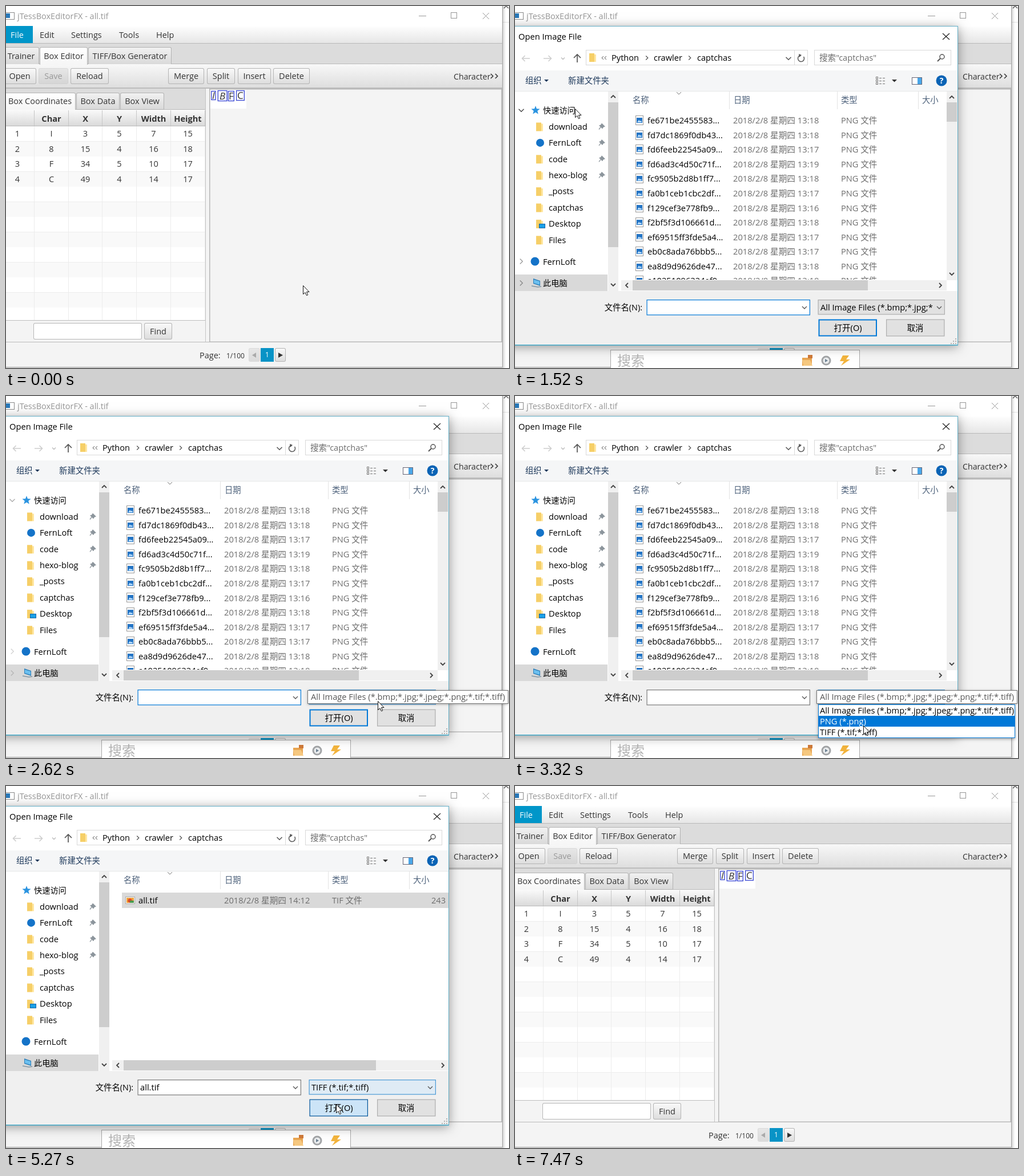
These frames come from a looping animation (881x635 px, 7600 ms). An HTML page with a canvas:

```html
<!DOCTYPE html>
<html lang="en">
<head>
<meta charset="utf-8">
<title>Box editor</title>
<style>
html, body { margin: 0; width: 100%; height: 100%; overflow: hidden; background: #fff; }
canvas { display: block; }
</style>
</head>
<body>
<canvas id="stage" width="881" height="635"></canvas>
<script>
const LOOP = 7600;
const g = document.getElementById('stage').getContext('2d');
const FONT = '"Open Sans", "Noto Sans CJK SC", "Noto Sans CJK JP", sans-serif';

// Drawing helpers
function rect(x, y, w, h, fill) {
  g.fillStyle = fill;
  g.fillRect(x, y, w, h);
}
function fade(y, h, top, bottom) {
  const c = g.createLinearGradient(0, y, 0, y + h);
  c.addColorStop(0, top);
  c.addColorStop(1, bottom);
  return c;
}
function frame(x, y, w, h, fill, border, line = 1) {
  rect(x, y, w, h, border);
  rect(x + line, y + line, w - 2 * line, h - 2 * line, fill);
}
function rounded(x, y, w, h, r, fill) {
  g.fillStyle = fill;
  g.beginPath();
  g.roundRect(x, y, w, h, r);
  g.fill();
}
function text(s, x, cy, color = '#333', size = 14.5, align = 'left', style = '') {
  g.font = `${style} ${size}px ${FONT}`;
  g.textAlign = align;
  g.fillStyle = color;
  g.fillText(s, x, Math.round(cy + size * 0.36));
}
function line(points, color, width = 1) {
  g.strokeStyle = color;
  g.lineWidth = width;
  g.beginPath();
  for (let i = 0; i < points.length; i += 2) g.lineTo(points[i], points[i + 1]);
  g.stroke();
}
function poly(points, fill) {
  g.fillStyle = fill;
  g.beginPath();
  for (let i = 0; i < points.length; i += 2) g.lineTo(points[i], points[i + 1]);
  g.fill();
}
function disc(x, y, r, fill) {
  g.fillStyle = fill;
  g.beginPath();
  g.arc(x, y, r, 0, 7);
  g.fill();
}
function chevron(x, y, dir, color = '#555', s = 4, width = 1.3) {
  const d = s / 2;
  const shape = {
    down: [x - s, y - d, x, y + d, x + s, y - d],
    up: [x - s, y + d, x, y - d, x + s, y + d],
    left: [x + d, y - s, x - d, y, x + d, y + s],
    right: [x - d, y - s, x + d, y, x - d, y + s]
  }[dir];
  line(shape, color, width);
}
function clipped(x, y, w, h, draw) {
  g.save();
  g.beginPath();
  g.rect(x, y, w, h);
  g.clip();
  draw();
  g.restore();
}
// Soft shadow around a box, leaving its inside untouched
function shadow(x, y, w, h, blur, drop, color) {
  g.save();
  g.beginPath();
  g.rect(0, 0, 881, 635);
  g.rect(x, y, w, h);
  g.clip('evenodd');
  g.shadowColor = color;
  g.shadowBlur = blur;
  g.shadowOffsetY = drop;
  rect(x, y, w, h, '#000');
  g.restore();
}

// Pointer: start, end, steps, then [progress, x, y] way points
const MOVES = [
  [70, 360, 5, [0, 520, 490], [1, 8, 114]],
  [1000, 1750, 11, [0, 8, 114], [4 / 11, 100, 178], [1, 112, 182]],
  [1840, 2540, 10, [0, 112, 182], [0.3, 572, 447], [0.7, 640, 505], [1, 650, 534]],
  [2620, 3320, 10, [0, 650, 534], [0.4, 655, 536], [1, 610, 578]],
  [3400, 3470, 2, [0, 610, 578], [1, 612, 587]],
  [3720, 4330, 9, [0, 612, 587], [0.12, 612, 587], [7 / 9, 241, 203], [1, 241, 203]],
  [4480, 5190, 10, [0, 241, 203], [0.5, 430, 400], [0.8, 600, 528], [1, 578, 558]],
  [6430, 6970, 8, [0, 578, 558], [0.25, 590, 566], [1, 755, 650]]
];
function pointer(t) {
  let at = [520, 490];
  for (const [start, end, n, ...way] of MOVES) {
    if (t < start) break;
    const step = Math.floor((t - start) / ((end - start) / (n - 1)) + 1e-6) + 1;
    const p = Math.min(1, step / n);
    const i = Math.max(1, way.findIndex(w => w[0] >= p));
    const a = way[i - 1], b = way[i], k = (p - a[0]) / (b[0] - a[0]);
    at = [a[1] + (b[1] - a[1]) * k, a[2] + (b[2] - a[2]) * k];
  }
  return at;
}
function drawPointer(x, y) {
  g.save();
  g.translate(Math.round(x) + 0.5, Math.round(y) + 0.5);
  const arrow = [0, 0, 0, 15, 3.5, 12, 6, 17.3, 8.2, 16.3, 6, 11, 10.5, 11, 0, 0];
  poly(arrow, '#fff');
  line(arrow, '#111');
  g.restore();
}

// Main window
function button(label, x, y, w, h, state) {
  g.globalAlpha = state === 'off' ? 0.4 : 1;
  const down = state === 'down';
  rounded(x, y, w, h, 3, down ? '#a2a2a2' : '#b4b4b4');
  rounded(x + 1, y + 1, w - 2, h - 2, 2,
    down ? fade(y, h, '#c9c9c9', '#d3d3d3') : fade(y, h, '#fafafa', '#dcdcdc'));
  text(label, x + w / 2, y + h / 2, '#333', 14.5, 'center');
  g.globalAlpha = 1;
}
function tab(label, x, y, w, h, cx, on) {
  rounded(x, y, w, h + 1, [3, 3, 0, 0], '#b2b2b2');
  rounded(x + 1, y + 1, w - 2, h + (on ? 1 : -1), [2, 2, 0, 0],
    on ? fade(y, h, '#fff', '#f6f6f6') : fade(y, h, '#f2f2f2', '#d9d9d9'));
  text(label, cx, y + h / 2 + 0.5, '#333', 14.5, 'center');
}
const COLS = [-10, 49, 109, 168, 228, 288, 348];
const BOXES = [['I', 3, 5, 7, 15], ['8', 15, 4, 16, 18], ['F', 34, 5, 10, 17], ['C', 49, 4, 14, 17]];

function drawTable() {
  const mid = c => c ? (COLS[c] + COLS[c + 1]) / 2 + 0.5 : 20;
  rect(0, 182, 349, 370, '#fff');
  rect(0, 182, 349, 28, fade(182, 28, '#fafafa', '#dadada'));
  rect(0, 210, 349, 1, '#b9b9b9');
  ['', 'Char', 'X', 'Y', 'Width', 'Height'].forEach((s, c) =>
    text(s, mid(c), 197.5, '#333', 14.6, 'center', 'bold'));
  clipped(0, 211, 349, 340, () => {
    for (let r = 0; r < 13; r++) {
      const y = Math.round(211 + r * 26.5);
      rect(0, y, 349, 27, r % 2 ? '#f9f9f9' : '#fff');
      rect(0, y + 26, 349, 1, '#ededed');
      if (r < 4) [r + 1, ...BOXES[r]].forEach((s, c) =>
        text(s, mid(c), y + 13, '#333', 14.5, 'center'));
    }
    for (const x of COLS.slice(1)) rect(x, 211, 1, 341, '#ececec');
  });
  for (const x of COLS.slice(1)) rect(x, 183, 1, 27, '#c6c6c6');
  rect(0, 551, 350, 1, '#bdbdbd');
  rect(349, 182, 1, 370, '#bdbdbd');
}
function drawSample() {
  rect(358, 147, 63, 33, '#fff');
  BOXES.forEach(([s, x, y, w, h], i) => {
    const bx = x * 0.95 + 357, by = y + 144.5, bw = w * 0.95 + 0.5;
    text(s === '8' ? 'B' : s, bx + bw / 2, by + h / 2, '#333', 17, 'center', i < 2 ? 'italic' : '');
    g.strokeStyle = '#3644d2';
    g.lineWidth = 1.3;
    g.strokeRect(bx, by, bw, h);
  });
}
function drawMain(active, menuOn, openDown) {
  rect(0, 0, 881, 635, '#fff');
  rect(870, 28, 11, 1, '#e4e4e4');
  chevron(876, 2, 'up', '#666', 4, 1.5);
  for (let i = 0; i < 7; i++) rect(870 + i, 0, 1, 635, `rgba(0,0,0,${0.17 * (1 - i / 7) ** 2})`);
  rect(0, 0, 869, 633, '#f4f4f4');
  rect(0, 0, 869, 36, '#fff');
  frame(-6, 11, 21, 13, '#fff', '#8a8a8a');
  rect(0, 13, 7, 8, '#2878b8');
  const ink = active ? '#000' : '#969696';
  text('jTessBoxEditorFX - all.tif', 20, 17.5, ink, 14.5);
  line([723, 17.5, 736, 17.5], ink);
  g.strokeRect(779.5, 11.5, 10, 10);
  line([835, 12, 846, 23], ink);
  line([846, 12, 835, 23], ink);

  rect(0, 36, 869, 29, fade(36, 29, '#fdfdfd', '#e6e6e6'));
  rect(0, 65, 869, 1, '#b9b9b9');
  if (menuOn) rect(0, 35, 47, 30, '#0096c9');
  text('File', 8, 50.5, menuOn ? '#fff' : '#333');
  [['Edit', 59], ['Settings', 114], ['Tools', 198], ['Help', 263]].forEach(([s, x]) => text(s, x, 50.5));

  rect(0, 66, 869, 36, '#dcdcdc');
  rect(0, 101, 869, 1, '#b9b9b9');
  tab('Trainer', -8, 72, 66, 30, 26.5);
  tab('TIFF/Box Generator', 144, 72, 146, 30, 217);
  rect(0, 102, 869, 41, fade(102, 41, '#f8f8f8', '#dedede'));
  rect(0, 143, 869, 2, '#bcbcbc');
  tab('Box Editor', 59, 72, 84, 30, 101, true);
  button('Open', -5, 109, 58, 28, openDown ? 'down' : '');
  button('Save', 57, 109, 52, 28, 'off');
  [['Reload', 113, 67], ['Merge', 284, 63], ['Split', 352, 49], ['Insert', 406, 58], ['Delete', 468, 64]]
    .forEach(([s, x, w]) => button(s, x, 109, w, 28));
  text('Character', 784, 123.5, '#333', 14.2);
  chevron(851, 123, 'right', '#333', 4, 1.5);
  chevron(859, 123, 'right', '#333', 4, 1.5);

  rect(0, 145, 350, 37, '#dcdcdc');
  rect(0, 181, 350, 1, '#b9b9b9');
  tab('Box Data', 123, 152, 76, 29, 161);
  tab('Box View', 200, 152, 77, 29, 238.5);
  tab('Box Coordinates', -4, 152, 126, 29, 59.5, true);
  drawTable();
  rect(349, 145, 1, 445, '#c4c4c4');
  frame(356, 145, 513, 445, '#f4f4f4', '#b7b7b7', 1.5);
  drawSample();
  rounded(48, 556, 190, 29, 3, '#b7b7b7');
  rounded(49, 557, 188, 27, 2, '#fff');
  button('Find', 242, 556, 49, 29);

  rect(0, 589, 869, 1, '#bababa');
  text('Page:', 339, 613);
  text('1/100', 386, 613.5, '#333', 12);
  button('', 425, 600, 20, 24, 'off');
  rect(446, 600, 23, 24, '#0893c6');
  text('1', 457.5, 612, '#fff', 12, 'center');
  button('', 471, 600, 19, 24);
  poly([438, 608, 438, 617, 431, 612.5], '#aaa');
  poly([477, 608, 477, 617, 485, 612.5], '#333');
  rect(0, 633, 870, 1, active ? '#707070' : '#a5a5a5');
  rect(869, 0, 1, 634, active ? '#707070' : '#a5a5a5');
  rect(0, 634, 870, 1, '#dedede');
}

// File dialog
const FILES = ('fe671be2455583 fd7dc1869f0db43 fd6feeb22545a09 fd6ad3c4d50c71f fc9505b2d8b1ff7 fa0b1ceb1cbc2df ' +
  'f129cef3e778fb9 f2bf5f3d106661d ef69515ff3fde5a4 eb0c8ada76bbb5 ea8d9d9626de47 a10251096324ef0').split(' ');
const MINUTES = [18, 18, 17, 19, 18, 17, 16, 18, 17, 17, 18, 18];
const PLACES = ['download', 'FernLoft', 'code', 'hexo-blog', '_posts', 'captchas', 'Desktop', 'Files'];
const ALL = 'All Image Files (*.bmp;*.jpg;*.jpeg;*.png;*.tif;*.tiff)';
const TIFF = 'TIFF (*.tif;*.tiff)';
const BLUE = '#0078d7';

function folder(x, y) {
  rect(x, y - 7, 9, 15, '#f6cf68');
  rect(x + 9, y - 5, 3, 13, '#ffe6a0');
}
function pin(x, y) {
  poly([x, y - 6, x + 6, y, x + 3, y + 1, x + 1, y + 4, x - 5, y - 2, x - 2, y - 3], '#8c959c');
  line([x - 2, y + 1, x - 5, y + 5], '#8c959c', 1.3);
}
function star(x, y) {
  const pts = [];
  for (let i = 0; i < 10; i++) {
    const r = i % 2 ? 3.4 : 8, a = i * Math.PI / 5 - Math.PI / 2;
    pts.push(x + r * Math.cos(a), y + r * Math.sin(a));
  }
  poly(pts, '#2b94e0');
}
function drawNav(s) {
  rect(0, 150, 163, 350, '#fff');
  rect(0, 471, 162, 29, '#d9d9d9');
  star(36, 183);
  text('快速访问', 49, 183, '#000', 14.2);
  PLACES.forEach((label, i) => {
    const y = 211.5 + i * 28.4;
    if (i === 1) disc(44, y, 7, '#1473c8');
    else folder(37, y);
    if (i === 6) frame(42, y, 11, 8, '#1aa0e8', '#0b62a8');
    text(label, 59, y, '#000', 14.7);
    if (i < 4) pin(152, y);
  });
  disc(35, 448, 7.5, '#1473c8');
  text('FernLoft', 49, 448.5, '#000', 14.7);
  poly([32, 478, 44, 482, 44, 491, 32, 487], '#2e7fb8');
  poly([33, 480, 43, 483, 43, 489, 33, 486], '#6cc0f0');
  line([29, 491, 40, 493, 46, 492], '#8296a4', 1.5);
  text('此电脑', 49, 486, '#000', 14.2);
  g.globalAlpha = s.chevrons;
  chevron(11, 183, 'down', '#444', 4.5);
  chevron(11, 448, 'right', '#999', 4.5);
  chevron(11, 486, 'right', '#888', 4.5);
  g.globalAlpha = 1;
  rect(163, 150, 18, 350, '#f0f0f0');
  rect(163, 169, 18, 254, s.thumbHot ? '#a6a6a6' : '#cdcdcd');
  chevron(172, 159, 'up', '#444', 4, 1.8);
  chevron(172, 489, 'down', '#444', 4, 1.8);
}
function fileRow(y, name, time, kind) {
  text(name, 232, y, '#000', 14.7);
  text('2018/2/8 星期四 ' + time, 382, y, '#6d6d6d', 14.7);
  text(kind + ' 文件', 571, y, '#6d6d6d', 14.6);
}
function drawFiles(s) {
  rect(181, 150, 594, 350, '#fff');
  [['名称', 206], ['日期', 383], ['类型', 571], ['大小', 713]].forEach(([h, x]) => text(h, x, 165, '#4c607a', 14.3));
  for (const x of [375, 564, 706]) rect(x, 150, 1, 31, '#e3e3e3');
  chevron(287, 153, 'down', '#777', 4, 1);
  if (s.tif) {
    rect(203, 187, 572, 27, s.rowFill);
    frame(209, 194, 17, 13, '#fff', '#a9a9a9');
    rect(211, 196, 13, 9, '#f0a23c');
    disc(217, 201, 3.5, '#d9482b');
    rect(217, 201, 7, 4, '#4c9a50');
    fileRow(201, 'all.tif', '14:12', 'TIF');
    text('243', 770, 201, '#6d6d6d', 14.6, 'right');
  } else {
    clipped(186, 182, 570, 298, () => FILES.forEach((name, i) => {
      const y = 201 + i * 25.55, [px, py] = s.at;
      if (px > 203 && px < 755 && py < 480 && Math.abs(py - y) < 12.8)
        rect(203, Math.floor(y - 13), 552, 26, '#e5f3ff');
      frame(211, Math.round(y) - 9, 14, 17, '#fff', '#999');
      rect(213, Math.round(y) - 5, 10, 9, '#2273c4');
      poly([214, y + 3, 217, y - 1, 219, y + 1, 221, y, 222, y + 3], '#bfe2ff');
      fileRow(y, name + '...', '13:' + MINUTES[i], 'PNG');
    }));
    rect(756, 150, 19, 331, '#f0f0f0');
    rect(756, 169, 18, 34, '#cdcdcd');
    chevron(765, 160, 'up', '#444', 4, 1.8);
    chevron(765, 470, 'down', '#444', 4, 1.8);
  }
  rect(186, 481, s.tif ? 589 : 570, 18, '#f0f0f0');
  rect(206, 481, s.tif ? 442 : 412, 18, '#cdcdcd');
  chevron(196, 490, 'left', '#444', 4, 1.8);
  chevron(s.tif ? 765 : 745, 490, 'right', '#444', 4, 1.8);
}
function drawBars() {
  rect(0, 71, 775, 42, '#fff');
  line([26, 92, 13, 92], '#ccc', 1.5);
  chevron(15, 92, 'left', '#ccc', 5, 1.5);
  line([50, 92, 63, 92], '#ccc', 1.5);
  chevron(61, 92, 'right', '#ccc', 5, 1.5);
  chevron(84, 92, 'down', '#bbb', 3);
  line([109, 99, 109, 86], '#555', 1.7);
  chevron(109, 88, 'up', '#555', 6, 1.7);
  frame(124, 77, 389, 27, '#fff', '#d9d9d9');
  rect(489, 78, 1, 25, '#d9d9d9');
  folder(130, 90);
  chevron(153.5, 91, 'left', '#555', 3, 1);
  chevron(158.5, 91, 'left', '#555', 3, 1);
  text('Python', 169, 90.5, '#000', 14.6);
  chevron(231, 91, 'right', '#555', 3.5);
  text('crawler', 243, 90.5, '#000', 14.6);
  chevron(306, 91, 'right', '#555', 3.5);
  text('captchas', 319, 90.5, '#000', 14.6);
  chevron(479, 92, 'down', '#555', 4.5, 1.5);
  g.strokeStyle = '#555';
  g.lineWidth = 1.5;
  g.beginPath();
  g.arc(501, 92, 5.5, -0.6, 4.2);
  g.stroke();
  poly([497, 84, 502, 86, 498, 90], '#555');
  frame(524, 77, 240, 27, '#fff', '#d9d9d9');
  text('搜索"captchas"', 533, 91, '#6d6d6d', 14.6);
  g.strokeStyle = '#555';
  g.beginPath();
  g.arc(748, 89, 4, 0, 7);
  g.stroke();
  line([745, 92, 740, 97], '#555', 2);

  rect(0, 113, 775, 37, '#f5f6f7');
  rect(0, 149, 775, 1, '#e6e7e8');
  text('组织', 18, 131, '#1e395b', 14.3);
  poly([51, 129, 59, 129, 55, 133], '#1e395b');
  text('新建文件夹', 93, 131, '#1e395b', 14.4);
  for (let i = 0; i < 3; i++) {
    frame(632, 124 + i * 5, 4, 4, '#fff', '#777');
    rect(638, 126 + i * 5, 4, 1, '#777');
    rect(644, 126 + i * 5, 4, 1, '#777');
  }
  poly([660, 129, 669, 129, 664.5, 133.5], '#333');
  frame(695, 125, 18, 13, '#fff', '#667');
  rect(705, 126, 7, 11, '#4aa6e8');
  disc(747, 131, 9.5, '#0a63b5');
  text('?', 747, 131, '#fff', 14, 'center', 'bold');
}
function drawFooter(s) {
  rect(0, 500, 775, 94, '#f0f0f0');
  text('文件名(N):', 223, 528.5, '#000', 14.4, 'right');
  frame(230.5, 515, 286.5, 27.5, '#fff', s.nameFocus ? BLUE : '#7a7a7a', 1.2);
  text(s.name, 235, 528.5, '#000', 14.7);
  chevron(507, 529, 'down', '#555', 4);
  frame(530.5, 515, 222.5, 26.5, s.comboHot ? '#dfebf5' : '#e1e1e1', s.comboHot ? '#4a9ad6' : '#adadad', 1.2);
  clipped(533, 516, 199, 24, () => text(s.tif ? TIFF : ALL, 535, 528.5, '#000', 14.65));
  chevron(743, 529, 'down', '#555', 4);
  if (s.pressed) frame(531.5, 549.5, 102.5, 30, '#cce4f7', '#005499', 1.2);
  else frame(531.5, 549.5, 102.5, 30, '#e1e1e1', BLUE, 2);
  text('打开(O)', 583, 564.5, '#000', 14.6, 'center');
  frame(650, 549.5, 102.5, 30, '#e1e1e1', '#adadad', 1.2);
  text('取消', 701, 564.5, '#000', 14.3, 'center');
  for (let i = 0; i < 3; i++)
    for (let j = 0; j <= i; j++) rect(771 - j * 4, 583 + i * 4, 2, 2, '#b0b0b0');
}
function drawPopup(s) {
  if (s.tip) {
    shadow(528, 516, 351, 24, 4, 1, 'rgba(0,0,0,.3)');
    frame(528, 516, 352, 24, '#fff', '#767676');
    text(ALL, 534, 528, '#575757', 14.65);
  }
  if (!s.list) return;
  shadow(531, 541, 345, 59, 5, 2, 'rgba(0,0,0,.35)');
  frame(531, 541, 345, 59, '#fff', BLUE);
  [ALL, 'PNG (*.png)', TIFF].forEach((label, i) => {
    const y = 542 + i * 19;
    if (i === s.pick) rect(532, y, 343, 19, BLUE);
    text(label, 534, y + 10, i === s.pick ? '#fff' : '#000', 14.65);
  });
}
function drawDialog(s) {
  shadow(-20, 35, 796, 560, 18, 3, 'rgba(0,0,0,.4)');
  rect(0, 36, 775, 35, '#fff');
  text('Open Image File', 6, 54, '#000', 14.7);
  line([749, 48, 761, 59], '#222', 1.2);
  line([761, 48, 749, 59], '#222', 1.2);
  if (s.full) {
    drawBars();
    drawNav(s);
    drawFiles(s);
    drawFooter(s);
  }
  rect(0, 35, 776, 1, '#62aec6');
  rect(775, 35, 1, 560, '#62aec6');
  rect(0, 594, 776, 1.5, '#3fa9c9');
}
function drawSearchPanel() {
  frame(167, 603, 437, 40, '#fff', '#a8a8a8');
  text('搜索', 179, 622, '#b4b4b4', 24);
  rect(503, 617, 17, 14, '#e9a550');
  poly([503, 621, 517, 621, 521, 631, 505, 631], '#f6c880');
  rect(513, 612, 8, 6, '#cf7a3a');
  disc(545, 622, 8.5, '#a3a5a7');
  disc(545, 622, 5.5, '#eceeef');
  poly([543, 619, 548, 622, 543, 625], '#6f8496');
  poly([574, 613, 585, 613, 580, 620, 587, 620, 571, 631, 576, 623, 569, 623], '#f3b43c');
}

function render(t) {
  const at = pointer(t);
  const dialog = t >= 850 && t < 5420;
  const s = {
    at,
    full: t >= 1320,
    tif: t >= 3720,
    thumbHot: t >= 1840 && t < 2300,
    chevrons: Math.max(0, Math.min(1, (2800 - t) / 400)),
    nameFocus: t < 2700,
    name: t >= 4330 ? 'all.tif' : '',
    rowFill: t >= 5270 ? '#d9d9d9' : t >= 4330 ? '#cce8ff' : t >= 4170 ? '#e5f3ff' : '#fff',
    comboHot: t >= 5040 || (t >= 2460 && t < 3720),
    pressed: t >= 5270,
    tip: t >= 2540 && t < 3720,
    list: t >= 2850 && t < 3720,
    pick: t >= 3440 ? 2 : t >= 3160 ? 1 : 0
  };
  const idle = t < 760 || t >= 7470;
  drawMain(!idle && !dialog, idle, t >= 760 && t < 5420);
  if (dialog) {
    if (s.full) drawSearchPanel();
    drawDialog(s);
    drawPopup(s);
  }
  if (t < 6970) drawPointer(...at);
}

const begin = performance.now();
function tick() {
  render((performance.now() - begin) % LOOP);
  requestAnimationFrame(tick);
}
tick();
</script>
</body>
</html>
```
